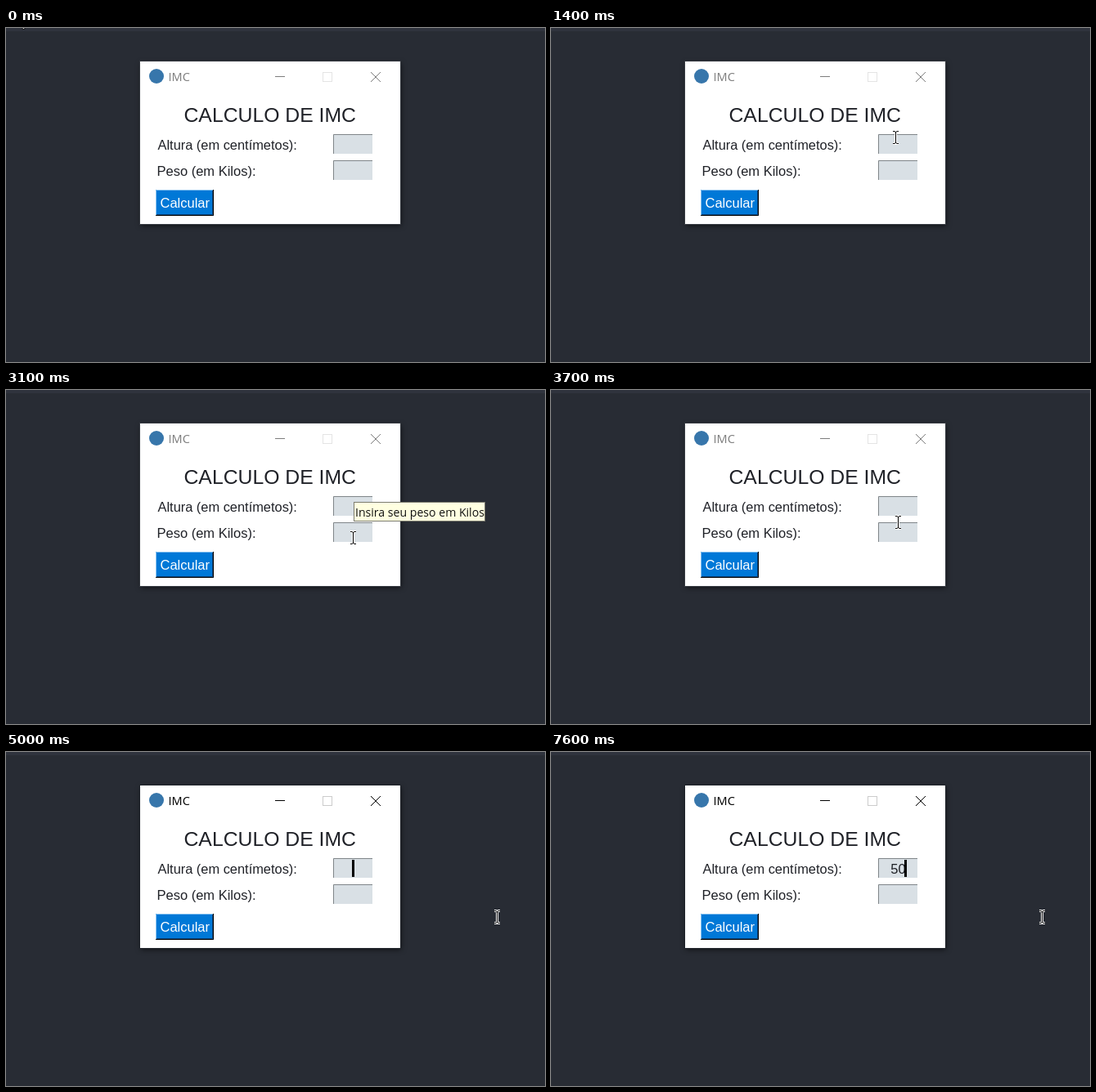
Recreate the animation shown at these times as an HTML page. Size 659 px wide and 409 px high, loop 8 s.

```html
<!DOCTYPE html>
<html lang="pt">
<head>
<meta charset="utf-8">
<title>IMC</title>
<style>
  html, body { margin: 0; width: 100%; height: 100%; overflow: hidden; background: #282c34; }
  svg { display: block; }
  text { font-family: "Liberation Sans", Arial, sans-serif; font-size: 16.5px; fill: #1f2127; }
  .ui text { font-family: "Open Sans", sans-serif; font-size: 14.1px; fill: #111; }
  .ui .tip { fill: #ffffe1; stroke: #7c7c70; }
  .window { filter: drop-shadow(1px 2px 3px #0009); }
  .chrome { --ink: #7d7d7d; --faint: #e4e4e4; --edge: #383c43; }
  .chrome.focused { --ink: #000; --faint: #ccc; --edge: #20242b; }
  .chrome text { font-size: 14.5px; fill: var(--ink); }
  .chrome path { fill: none; stroke: var(--ink); }
</style>
</head>
<body>
<svg width="659" height="409" viewBox="0 0 659 409">
  <rect width="659" height="409" fill="#282c34"/>
  <rect width="659" height="4" fill="#2f333d"/>

  <rect class="window" x="164" y="41" width="318" height="199" fill="#fff"/>
  <g class="ui chrome" id="chrome">
    <rect x="163.5" y="40.5" width="319" height="200" fill="none" style="stroke:var(--edge)"/>
    <circle cx="184" cy="59" r="9" fill="#3776ab"/>
    <text x="198.5" y="65">IMC</text>
    <path d="M329 59.5h12M446 54l12 12m0-12l-12 12"/>
    <rect x="387.5" y="54.5" width="11" height="11" fill="none" style="stroke:var(--faint)"/>
  </g>

  <text x="217.5" y="115" style="font-size:24.75px">CALCULO DE IMC</text>
  <text x="185.5" y="149" style="font-size:16.4px">Altura (em centímetos):</text>
  <text x="184.5" y="181">Peso (em Kilos):</text>

  <g id="field">
    <rect x="400" y="130" width="48" height="24" fill="#d9e0e5"/>
    <path d="M400.5 154v-23.5H448" fill="none" stroke="#7f8589"/>
  </g>
  <use href="#field" y="32"/>
  <text id="value" x="424.5" y="149" text-anchor="middle"></text>
  <rect id="caret" x="423" y="132" width="3" height="21"/>

  <rect x="183" y="198" width="71" height="32" fill="#0078d7"/>
  <path d="M183.5 230v-31.5H254" fill="none" stroke="#8cc4f0"/>
  <path d="M184 228.5h68.5V199" fill="none" stroke="#004881"/>
  <path d="M183 229.5h70.5V198" fill="none" stroke="#000"/>
  <text x="188.5" y="220" style="fill:#fff">Calcular</text>

  <g class="ui" id="heightTip">
    <rect class="tip" x="420.5" y="108.5" width="224" height="23"/>
    <text x="422" y="126">Insira sua Altura em Centrimetros</text>
  </g>
  <g class="ui" id="weightTip">
    <rect class="tip" x="425.5" y="137.5" width="160" height="23"/>
    <text x="427" y="155">Insira seu peso em Kilos</text>
  </g>

  <g id="ibeam" fill="none" stroke="#000">
    <path d="M-3 -7.5h2l1.5 1l1.5 -1h2M.5 -7v14M-3 7.5h2l1.5 -1l1.5 1h2" stroke="#fff" stroke-width="3"/>
    <path d="M-3 -7.5h2l1.5 1l1.5 -1h2M.5 -7v14M-3 7.5h2l1.5 -1l1.5 1h2"/>
  </g>
  <path id="arrow" d="M.5 .5v16l3.7-3.5 2.5 5.7 2.4-1-2.4-5.5h5z" fill="#fff" stroke="#000"/>
</svg>

<script>
const LOOP = 8000, TICK = 100;
const el = id => document.getElementById(id);
const show = (id, on) => el(id).style.display = on ? "" : "none";
const within = (v, a, b) => v >= a && v < b;

// Pointer strokes: first tick, last tick, control point, end point
const start = [14, -17];
const strokes = [
  [300, 1100, [150, 348], [416, 131]],
  [1300, 1400, [419, 132], [421, 134]],
  [2400, 2800, [426, 154], [424, 181]],
  [3600, 3900, [424, 162], [424, 144]],
  [4500, 4700, [500, 185], [600, 202]],
];
const caretOn = [[4100, 4700], [5000, 5600], [5900, 6400], [6700, 7300], [7600, LOOP]];

function pointerAt(t) {
  let from = start;
  for (const [first, last, mid, to] of strokes) {
    if (t < first) break;
    const s = Math.min(1, (t - first + TICK) / (last - first + TICK));
    from = from.map((a, i) =>
      Math.round((1 - s) ** 2 * a + 2 * s * (1 - s) * mid[i] + s * s * to[i]));
  }
  return from;
}

function isTextArea(x, y) {
  const inWindow = within(x, 164, 482) && within(y, 41, 240);
  const inField = within(x, 400, 448) && (within(y, 130, 154) || within(y, 162, 186));
  return inField || (!inWindow && y > 4);
}

function draw(now) {
  const t = Math.floor(now % LOOP / TICK) * TICK;
  const [x, y] = pointerAt(t);
  const beam = isTextArea(x, y);
  show("ibeam", beam);
  show("arrow", !beam);
  el(beam ? "ibeam" : "arrow").setAttribute("transform", `translate(${x} ${y})`);

  show("heightTip", within(t, 1700, 2600));
  show("weightTip", within(t, 3100, 3700));
  el("chrome").classList.toggle("focused", t >= 4100);

  const value = "50".slice(0, t < 6800 ? 0 : t < 6900 ? 1 : 2);
  el("value").textContent = value;
  el("caret").setAttribute("x", 423 + 4.5 * value.length);
  show("caret", caretOn.some(([a, b]) => within(t, a, b)));
}

const origin = performance.now();
function loop() {
  draw(performance.now() - origin);
  requestAnimationFrame(loop);
}
loop();
</script>
</body>
</html>
```
